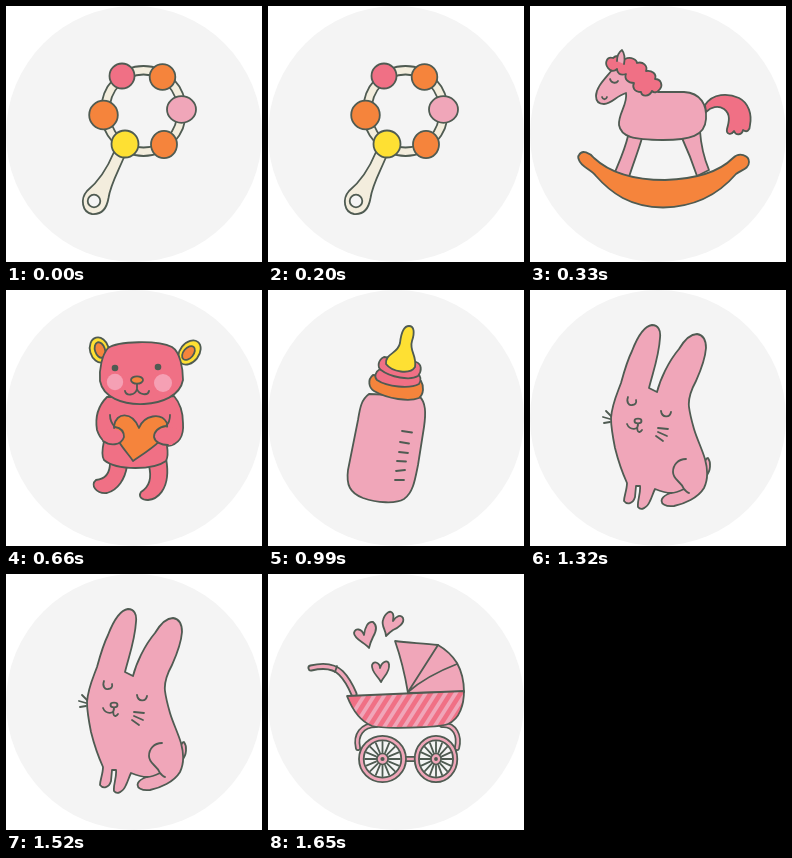
Recreate the animation shown at these times as an HTML page. Size 256x256 px, loop 1.98 s.

```html
<!DOCTYPE html>
<html lang="en">
<head>
<meta charset="utf-8">
<title>Nursery toys</title>
<style>
html, body { margin: 0; width: 100%; height: 100%; overflow: hidden; background: #fff; }
svg { display: block; width: 100vw; height: 100vh; }
.toy { display: none; stroke: #4f5b52; stroke-width: 1.8; stroke-linecap: round; stroke-linejoin: round; fill: none; }
.toy.on { display: inline; }
.pink { fill: #f0a6b9; }
.rose { fill: #f07085; }
.orange { fill: #f5843c; }
.yellow { fill: #fee033; }
.cream { fill: #f3eddd; }
.paper { fill: #f4f4f4; }
.ink { fill: #4f5b52; stroke: none; }
.bare { stroke: none; }
</style>
</head>
<body>
<svg viewBox="0 0 256 256">
<defs>
  <clipPath id="basket"><path d="M79 122 L196 117 C196 130 192 145 180 150 C170 154 114 155 104 152 C92 147 84 135 79 122Z"/></clipPath>
</defs>
<circle class="paper" cx="128" cy="128" r="128"/>

<!-- rattle -->
<g class="toy on">
  <path class="cream" fill-rule="evenodd" d="M137.500 60 C161 60 180 80 180 105 C180 130 161 150 137.500 150 C114 150 95 130 95 105 C95 80 114 60 137.500 60Z M137.500 68.500 C118 68.500 103.500 85 103.500 105 C103.500 125 118 141.500 137.500 141.500 C157 141.500 171.500 125 171.500 105 C171.500 85 157 68.500 137.500 68.500Z"/>
  <path class="cream" d="M108 146 C101 163 92 176 81 185 C74 193 76 206 86 208 C97 209 101 201 102.500 192 C104.500 178 112 166 118.500 150Z"/>
  <circle class="paper" cx="88" cy="195" r="6.300"/>
  <circle class="rose" cx="116" cy="70" r="12.500"/>
  <circle class="orange" cx="156.500" cy="71" r="12.800"/>
  <ellipse class="pink" cx="175.500" cy="103.500" rx="14.500" ry="13.300"/>
  <ellipse class="orange" cx="158" cy="138.500" rx="13" ry="13.700"/>
  <circle class="yellow" cx="119" cy="138" r="13.500"/>
  <circle class="orange" cx="97.500" cy="109" r="14.300"/>
</g>

<!-- rocking horse -->
<g class="toy">
  <path class="pink" d="M98 130 C95 143 90 154 85 166 L99 171 C103 158 108 146 112 132Z M152 132 C158 145 163 158 167 170 L179 164 C174 152 171 140 170 125Z"/>
  <path class="orange" d="M49 149 C52 143 60 147 64 152 C80 167 105 174 135 174 C165 173 188 167 203 152 C209 146 219 149 219 156 C219 163 211 164 206 168 C188 189 165 201 133 201.500 C100 201 81 187 66 170 C61 163 51 161 49 154 C48 152 48 150 49 149Z"/>
  <path class="rose" d="M175 99 C183 87 198 87 209 92 C219 97 222 109 220 119 C220 124 217 127 213 124 C212 129 206 130 204 125 C201 130 196 128 197 123 C199 116 201 108 194 103 C188 99 181 101 176 106Z"/>
  <path class="pink" d="M82 64 C75 73 66 81 66 90 C66 95 69 98 74 98 C82 98 86 90 96 87 C98 98 88 108 89 119 C91 131 103 133.500 133 134 C160 134 175 130 176 113 C177 99 171 87 154 86 L128 86 C118 82 112 72 104 60Z"/>
  <path class="rose" d="M78 62 C74 57 77 50 83 52 C87 48 93 51 95 53 C101 50 107 54 107 57 C113 55 118 60 116 65 C122 64 127 68 125 73 C131 73 133 79 130 83 C127 87 124 87 122 85 C119 91 112 91 111 86 C104 86 102 81 104 77 C98 77 94 73 96 68 C90 70 87 67 87 63 C84 66 80 65 78 62Z"/>
  <path class="pink" d="M87 55 C87 50 89 46 92 44 C95 48 95 53 94 58"/>
  <path d="M80 73 C81 77 86 78 88 75 M72 91 C73 94 76 94 77 91"/>
</g>

<!-- bear -->
<g class="toy">
  <path class="rose" d="M104 173 C104 183 99 189 90 190 C84 195 90 204 101 203 C112 200 119 189 121 176Z M143 176 C146 188 143 197 135 202 C132 207 136 210 142 210 C154 209 160 197 161 187 C162 180 161 174 160 168Z"/>
  <path class="rose" d="M101 107 C92 116 89 128 91 140 C93 146 95 149 98 151 C96 160 96 167 98 170 C111 181 148 180 160 171 C162 167 162 162 161 156 C173 155 178 146 177 133 C177 122 174 113 168 106Z"/>
  <path class="orange" d="M127 171 C122 163 107 149 108 136 C110 122 126 121 133 138 C138 125 155 122 161 133 C164 148 143 160 127 171Z"/>
  <path class="rose bare" d="M98 141 C105 136 116 139 118 147 C118 154 107 157 97 151Z M175 140 C166 135 150 137 148 146 C149 152 156 156 166 155Z"/>
  <path d="M104 125 C104 130 106 134 109 137 C115 138 118 142 118 147 C115 156 104 156 97 151 M164 125 C164 130 163 133 160 136 C152 137 148 142 148 147 C149 152 155 155 162 155"/>
  <ellipse class="yellow" cx="93.500" cy="60" rx="9.500" ry="12.800" transform="rotate(-16 93.500 60)"/>
  <ellipse class="orange" cx="94" cy="60" rx="5" ry="8" transform="rotate(-18 94 60)"/>
  <ellipse class="yellow" cx="183.500" cy="62.500" rx="9.500" ry="13.500" transform="rotate(38 183.500 62.500)"/>
  <ellipse class="orange" cx="182.500" cy="63" rx="5" ry="8" transform="rotate(40 182.500 63)"/>
  <path class="rose" d="M102 58 C112 51 152 50 166 57 C174 62 177 78 177 90 C174 106 156 113 138 114 C116 115 97 107 94 91 C93 79 96 65 102 58Z"/>
  <g class="bare" fill="#f5a0b4"><circle cx="109" cy="92" r="8.200"/><circle cx="157" cy="93" r="9"/></g>
  <circle class="ink" cx="109" cy="78" r="3.300"/>
  <circle class="ink" cx="152" cy="77" r="3.300"/>
  <ellipse class="orange" cx="131" cy="90" rx="6" ry="3.700"/>
  <path d="M131 94 V99 M119 101 C120 106 129 106 131 99 C133 105 142 106 143 101"/>
</g>

<!-- bottle -->
<g class="toy">
  <path class="pink" d="M101 104 C93 110 92 118 90 130 L80 180 C78 195 82 203 95 208 C109 213 128 214 136 209 C145 203 147 190 150 175 L156 137 C158 123 158 112 151 106Z"/>
  <path class="orange" d="M105 85 C99 90 101 98 106 101 C120 109 141 112 151 108 C156 104 156 96 153 91Z"/>
  <path class="rose" d="M112 79 C107 82 106 87 109 90 C119 97 142 99 151 94 C154 90 152 85 150 84Z"/>
  <path class="rose" d="M116 67 C110 70 109 77 113 80 C122 87 142 91 150 86 C154 81 154 74 148 72Z"/>
  <path class="yellow" d="M118 74 C117 63 130 64 132 53 C133 44 135 36 141 36 C146 36 147 42 144 51 C141 61 149 65 147 77 C142 85 124 82 118 74Z"/>
  <path d="M134 141 L144 142.500 M132 152 L141 153.500 M131 162 L140 163 M129 171 L138 171.500 M128 181 L137 180 M127 190 L136 190"/>
</g>

<!-- rabbit -->
<g class="toy">
  <path class="pink" d="M174 176 C174 172 176 168 178 168 C181 172 181 181 176 186Z"/>
  <path class="pink" d="M119 98 L127 102 C130 90 138 72 149 59 C155 49 161 44 167 44 C174 45 176 51 176 58 C175 71 170 82 166 91 C160 102 158 109 159 117 C160 125 162 132 164 139 C167 149 172 159 175 169 C178 180 178 190 174 198 C168 208 154 214 144 216 C136 217 130 214 132 209 C134 205 138 204 141 203 C136 203 130 201 125 199 C123 203 122 207 120 211 C117 218 111 221 108 217 C107 211 111 203 110 196 L106 196 L105 207 C103 214 97 215 94 211 C94 206 97 200 97 193 C92 182 88 170 85 158 C83 148 81 138 81 128 C82 114 87 104 91 93 C94 82 97 71 102 61 C107 48 114 36 122 35 C128 35 131 40 130 48 C129 66 123 82 119 98Z"/>
  <path d="M156 169 C148 169 143 175 143 182 C143 190 151 191 154 199 M141 203 C146 203 150 201 154 199 C157 202 157 203 159 203"/>
  <path d="M98 107 C96 112 99 116 102 115 C105 115 107 113 106 110 M131 121 C132 128 140 128 141 122 M108 134 C109 140 100 141 97 134 M108 134 C106 142 109 144 112 140 M128 138 L138 139 M128 142 L137 146 M126 146 L133 151 M76 121 L81 126 M73 127 L80 129 M74 133 L80 132"/>
  <ellipse class="pink" cx="108" cy="131" rx="3.500" ry="2.300"/>
</g>

<!-- pram -->
<g class="toy">
  <path d="M43 94 C56 91 66 92 73 99 C80 106 83 113 86 120" stroke-width="7"/>
  <path d="M43 94 C56 91 66 92 73 99 C80 106 83 113 86 120" stroke-width="3.300" stroke="#f0a6b9"/>
  <path d="M69 92 L67 98"/>
  <path d="M108 151 C94 151 87 161 90 174 M174 151 C187 150 192 162 189 174 M115 185 H166" stroke-width="6"/>
  <path d="M108 151 C94 151 87 161 90 174 M174 151 C187 150 192 162 189 174 M115 185 H166" stroke-width="2.600" stroke="#f0a6b9"/>
  <path class="pink" d="M127 67 C140 69 156 69 170 71 C177 75 184 81 189 89 C194 98 196 108 196 118 L140 119 C137 101 133 84 127 67Z"/>
  <path d="M140 118 L170 71 M140 118 C155 105 171 97 189 90"/>
  <g clip-path="url(#basket)">
    <path class="rose bare" d="M70 110 H205 V160 H70Z"/>
    <path id="stripes" stroke="#f0a6b9" stroke-width="3.800"/>
  </g>
  <path d="M79 122 L196 117 C196 130 192 145 180 150 C170 154 114 155 104 152 C92 147 84 135 79 122Z"/>
  <g id="wheels"></g>
  <path class="pink" d="M101 74 C97 69 86 65 86 59 C87 53 94 55 96 61 C97 53 100 47 105 48 C110 52 108 58 105 63 C103 67 102 70 101 74Z"/>
  <path class="pink" d="M118 62 C118 56 113 52 115 46 C117 39 123 35 125 40 C126 42 125 45 125 47 C128 42 133 40 135 44 C137 49 130 54 125 56 C122 58 120 60 118 62Z"/>
  <path class="pink" d="M113 108 C110 102 103 98 104 91 C106 86 112 89 112 94 C114 87 121 85 121 91 C122 98 116 102 113 108Z"/>
</g>
</svg>
<script>
const STEP = 330;
const toys = [...document.querySelectorAll('.toy')];

let stripes = '';
for (let x = 73; x < 205; x += 10) stripes += `M${x} 158 L${x + 28} 114 `;
document.getElementById('stripes').setAttribute('d', stripes);

function wheel(cx, cy, rx, ry) {
  const ring = (k, look) =>
    `<ellipse class="${look}" cx="${cx}" cy="${cy}" rx="${rx * k}" ry="${ry * k}"/>`;
  let spokes = '';
  for (let i = 0; i < 16; i++) {
    const a = i * Math.PI / 8;
    const at = k => `${cx + rx * k * Math.cos(a)} ${cy + ry * k * Math.sin(a)}`;
    spokes += `M${at(0.3)} L${at(0.74)} `;
  }
  return ring(1, 'pink') + ring(0.8, 'paper') + `<path d="${spokes}"/>`
    + ring(0.24, 'pink') + ring(0.09, 'ink');
}
document.getElementById('wheels').innerHTML =
  wheel(114.5, 185, 23.5, 23.2) + wheel(168, 185, 21.3, 23.2);

const start = performance.now();
function draw() {
  const shown = Math.floor((performance.now() - start) / STEP) % toys.length;
  toys.forEach((toy, i) => toy.classList.toggle('on', i === shown));
  requestAnimationFrame(draw);
}
draw();
</script>
</body>
</html>
```
